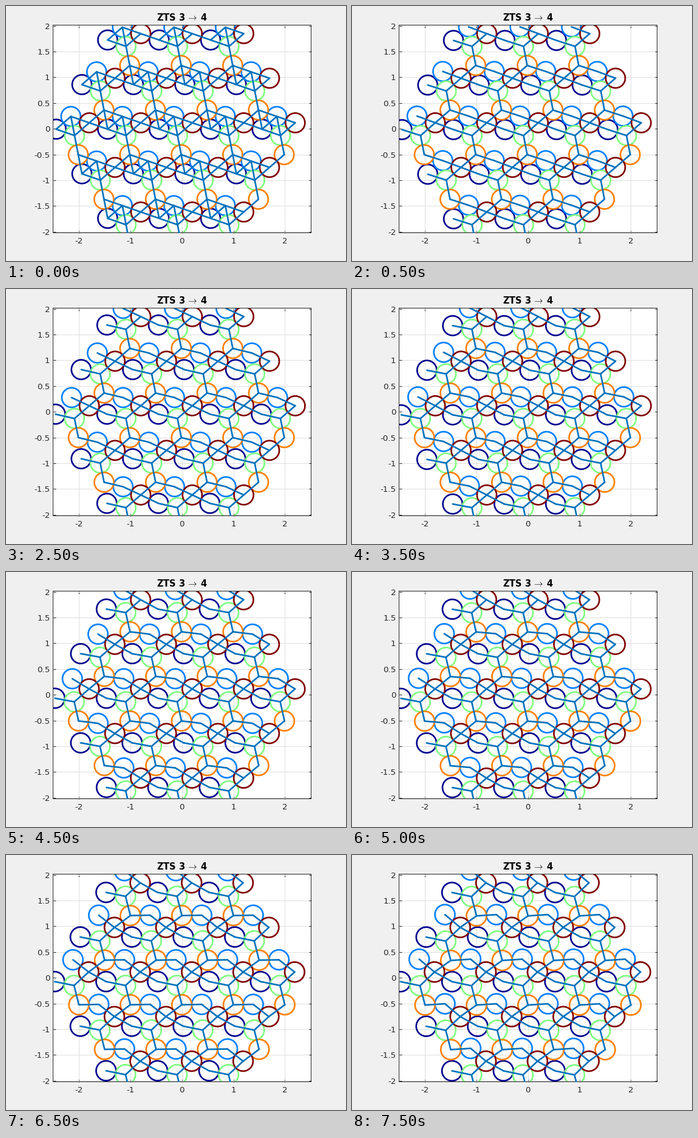
Write a matplotlib script that moves like this. It is 560 by 420 pixels and loops after 8 s.

```python
import numpy as np
import matplotlib.pyplot as plt
from matplotlib.animation import FuncAnimation
from matplotlib.collections import LineCollection

W, H, DPI = 560, 420, 100
FRAMES, STEP = 16, 500
PX = 72 / DPI  # points per pixel
INK = "#262626"

# Plot box, position of the origin and pixels per unit
LEFT, RIGHT, TOP, BOTTOM = 77.5, 502.5, 31.5, 373.5
X0, Y0, UNIT = 289.8, 202.25, 84.8

A1 = np.array([1, 0])
A2 = np.array([0.5, np.sqrt(3) / 2])
CELLS = [i * A1 + j * A2
         for j in range(-2, 3) for i in range(-2, 3) if abs(i + j) <= 2]
CENTROID = np.array([-0.1, -0.057])

# Disks of one cell: 0 navy, 1 blue, 2 green, 3 orange, 4 maroon
COLORS = ["#00008f", "#0080ff", "#80ff80", "#ff8000", "#800000"]

# Bonds: disk, disk, offset of the second disk's cell
BONDS = [(0, 2, 0 * A1), (2, 3, 0 * A1), (2, 4, 0 * A1), (1, 4, 0 * A1),
         (4, 0, A1), (3, 1, A1 - A2), (4, 3, A2)]
BROKEN = [(0, 1, 0 * A1), (1, 2, 0 * A1), (3, 0, A1 - A2)]

# How far the navy and blue disks buckle out of line, in pixels
KNOTS = [0, 3, 7, 9, 11, 13, 15]
NAVY = [0, 2.4, 4.7, 5.1, 5.2, 5.0, 4.9]
BLUE = [0, 2.0, 4.4, 6.8, 8.8, 10.9, 12.2]


def apex(p, q, size):
    """Point at distance size from p and q, left of the way from p to q."""
    d = q - p
    n = np.hypot(*d)
    h = np.sqrt(max(size**2 - n**2 / 4, 0))
    return (p + q) / 2 + h * np.array([-d[1], d[0]]) / n


def frame_part(size, bend):
    """Maroon and orange disks relative to the green one."""
    c = (1 - 3 * size**2 + 4 * bend**2) / (2 * size)
    maroon = size * np.array([c, np.sqrt(1 - c * c)])
    orange = apex(np.zeros(2), maroon - A2, size)
    return maroon, orange


def solve(n):
    """Bond length and the five disk positions of a cell at step n."""
    bend = np.interp(n, KNOTS, NAVY) / UNIT
    lift = np.interp(n, KNOTS, BLUE) / UNIT
    lo, hi = 0.37, 0.40
    for _ in range(40):
        size = (lo + hi) / 2
        maroon, orange = frame_part(size, bend)
        gap = maroon - (orange - A1 + A2)
        if size**2 - gap @ gap / 4 < lift**2:
            lo = size
        else:
            hi = size
    green = np.zeros(2)
    # The navy disk hangs below the line from maroon to green
    navy = apex(green, maroon - A1, size)
    blue = apex(orange - A1 + A2, maroon, size)
    pts = np.array([navy, blue, green, orange, maroon])
    return size, pts - pts.mean(axis=0) + CENTROID


def in_patch(cell):
    return any(np.allclose(cell, c) for c in CELLS)


def links(bonds):
    return [(a, b, c, c + off) for a, b, off in bonds
            for c in CELLS if in_patch(c + off)]


KEPT, LOST = links(BONDS), links(BROKEN)

fig = plt.figure(figsize=(W / DPI, H / DPI), dpi=DPI, facecolor="#f0f0f0")
ax = fig.add_axes([LEFT / W, 1 - BOTTOM / H, (RIGHT - LEFT) / W, (BOTTOM - TOP) / H])
xticks, yticks = np.arange(-2, 3), np.arange(-2, 2.1, 0.5)
ax.set_xticks(xticks, [f"{v}" for v in xticks])
ax.set_yticks(yticks, [f"{v:g}" for v in yticks])
ax.set_xlim((LEFT - X0) / UNIT, (RIGHT - X0) / UNIT)
ax.set_ylim((Y0 - BOTTOM) / UNIT, (Y0 - TOP) / UNIT)
ax.set_axisbelow(True)
ax.grid(color="#dfdfdf", lw=PX)
ax.tick_params(direction="in", top=True, right=True, length=4.2 * PX, width=PX,
               color=INK, labelcolor=INK, labelsize=13.33 * PX)
ax.tick_params(axis="x", pad=7.5 * PX)
ax.tick_params(axis="y", pad=5 * PX)
for side in ax.spines.values():
    side.set(color=INK, linewidth=PX, snap=False)
for label in ax.get_xticklabels() + ax.get_yticklabels():
    label.set_fontfamily("DejaVu Sans")
fig.text(289.8 / W, 1 - 24 / H, r"ZTS 3 $\!\rightarrow\!$ 4", ha="center",
         va="baseline", family="DejaVu Sans", weight="bold",
         math_fontfamily="cm", size=14.67 * PX, color="black")

turn = np.linspace(0, 2 * np.pi, 73)
ring = np.column_stack([np.cos(turn), np.sin(turn)])
disks = LineCollection([], linewidths=2.67 * PX, zorder=2,
                       colors=[c for c in COLORS for _ in CELLS])
rods = LineCollection([], linewidths=2.67 * PX, colors="#0072bd",
                      capstyle="round", zorder=3)
ax.add_collection(disks, autolim=False)
ax.add_collection(rods, autolim=False)


def draw(n):
    size, pts = solve(n)
    disks.set_segments([p + c + ring * size / 2 for p in pts for c in CELLS])
    pairs = KEPT + LOST if n == 0 else KEPT
    rods.set_segments([[pts[a] + c, pts[b] + d] for a, b, c, d in pairs])
    return disks, rods


anim = FuncAnimation(fig, draw, frames=FRAMES, interval=STEP,
                     repeat=True, repeat_delay=0)
plt.show()
```
